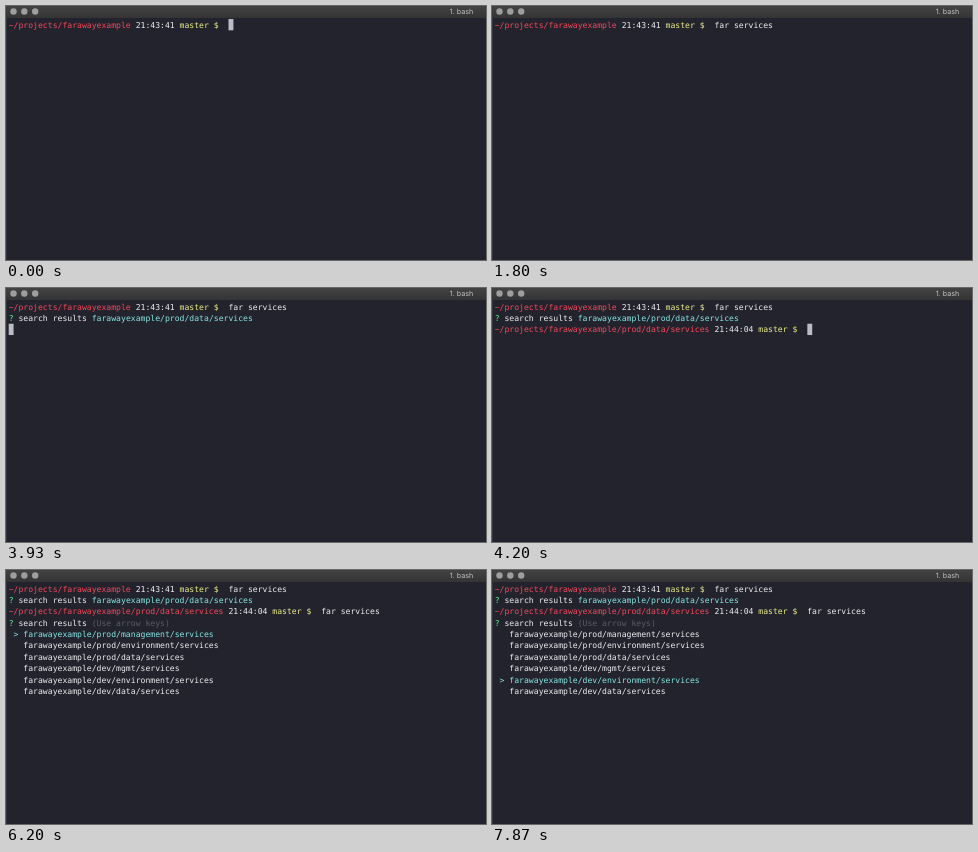
These frames come from a looping animation (480 by 254 pixels, 8 s). An HTML page:

```html
<!DOCTYPE html>
<html lang="en">
<head>
<meta charset="utf-8">
<title>bash</title>
<style>
html, body { margin: 0; height: 100%; overflow: hidden; background: #23232e; }
svg { display: block; width: 100vw; height: 100vh; }
text { white-space: pre; text-rendering: geometricPrecision; }
#screen { font: 8.115px "DejaVu Sans Mono", monospace; fill: #eeeef0; }
.title { font: 7.2px Inter, sans-serif; fill: #c0c0c0; }
.red { fill: #f4485a; }
.yellow { fill: #eef086; }
.cyan { fill: #86e6e4; }
.green { fill: #5af08c; }
.gray { fill: #5b5b66; }
.cursor { fill: #bcbcc8; }
</style>
</head>
<body>
<svg viewBox="0 0 480 254">
  <defs>
    <linearGradient id="bar" x2="0" y2="1">
      <stop stop-color="#434343"/>
      <stop offset="1" stop-color="#343434"/>
    </linearGradient>
  </defs>
  <rect width="480" height="254" fill="#23232e"/>
  <rect y="12" width="1" height="242" fill="#34343d"/>
  <rect width="480" height="12" fill="url(#bar)"/>
  <g fill="#9e9e9e">
    <circle cx="7.5" cy="5.5" r="3.2"/>
    <circle cx="18.3" cy="5.5" r="3.2"/>
    <circle cx="29.2" cy="5.5" r="3.2"/>
  </g>
  <text class="title" x="443.7" y="8.3">1. bash</text>
  <g id="screen"></g>
</svg>
<script>
const LOOP = 8000, LEFT = 2.7, COL = 4.885, ROW = 11.37, BASE = 21.6;
const COMMAND = "far services";
const KEYS = [270, 330, 470, 530, 670, 740, 870, 1130, 1200, 1270, 1470, 1530];
const CHOICES = ["prod/management", "prod/environment", "prod/data",
  "dev/mgmt", "dev/environment", "dev/data"].map(p => `farawayexample/${p}/services`);
// [time, selected choice]
const FIRST = [[1930, 0], [2870, 1], [3000, 2]];
const SECOND = [[6130, 0], [7270, 1], [7400, 2], [7530, 3], [7670, 4], [7770, 5], [7870, 4]];

const span = (color, s) => `<tspan class="${color}">${s}</tspan>`;
const prompt = (path, time, typed) =>
  span("red", "~/projects/" + path) + ` ${time} ` + span("yellow", "master $") + "  " + typed;
const question = span("green", "?") + " search results ";
const selected = (moves, t) => moves.filter(m => m[0] <= t).pop()[1];
const menu = pick => [question + span("gray", "(Use arrow keys)"),
  ...CHOICES.map((c, i) => i === pick ? span("cyan", " > " + c) : "   " + c)];

// Returns the text lines and the cursor's [column, row], if visible
function state(t) {
  const typed = KEYS.filter(k => k <= t).length;
  const lines = [prompt("farawayexample", "21:43:41", COMMAND.slice(0, typed))];
  let cursor = null;
  if (t < 1800) cursor = [45 + typed, 0];
  else if (t < 1930) cursor = t < 1870 ? null : [0, 1];
  else if (t < 3930) lines.push(...menu(selected(FIRST, t)));
  else {
    lines.push(question + span("cyan", CHOICES[2]));
    if (t < 4130) cursor = [0, 2];
    else {
      const recalled = t < 4930 ? "" : COMMAND;
      lines.push(prompt(CHOICES[2], "21:44:04", recalled));
      if (t < 6000) cursor = [64 + recalled.length, 2];
      else if (t < 6130) cursor = [0, 3];
      else lines.push(...menu(selected(SECOND, t)));
    }
  }
  return { lines, cursor };
}

const screen = document.getElementById("screen");
let shown = "";
function draw(now) {
  const { lines, cursor } = state(now % LOOP);
  let html = lines.map((s, i) => `<text x="${LEFT}" y="${BASE + i * ROW}">${s}</text>`).join("");
  if (cursor) {
    const [c, r] = cursor;
    html += `<rect class="cursor" x="${LEFT + c * COL}" y="${13 + r * ROW}" width="${COL}" height="11.3"/>`;
  }
  if (html !== shown) screen.innerHTML = shown = html;
  requestAnimationFrame(draw);
}
draw(0);
</script>
</body>
</html>
```
